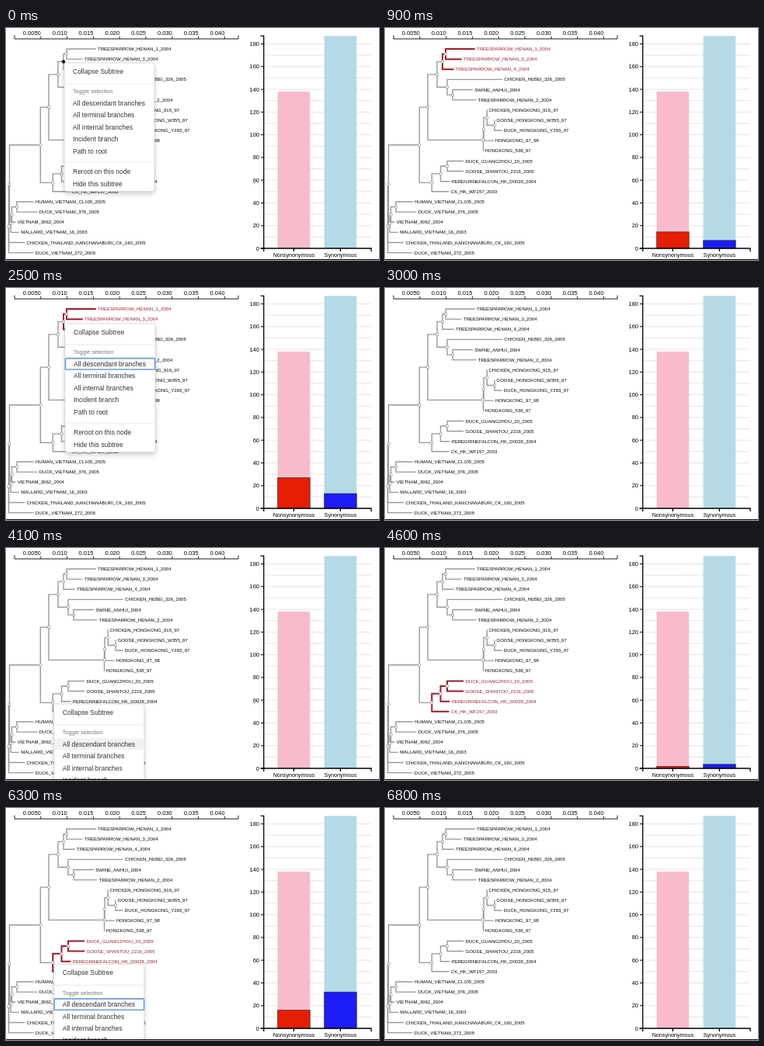
Recreate the animation shown at these times as an HTML page. Size 480x299 px, loop 7000 ms.

```html
<!DOCTYPE html>
<html lang="en">
<head>
<meta charset="utf-8">
<title>Tree selection and substitution counts</title>
<style>
html, body { margin: 0; width: 100%; height: 100%; overflow: hidden; background: #fff; }
svg { display: block; width: 480px; height: 299px; font-family: "Liberation Sans", Arial, sans-serif; }
.branch { fill: none; stroke: #999; stroke-width: 1.4; }
.branch.on { stroke: #9e1a2c; stroke-width: 2; }
.tip { font-size: 6.02px; }
.tip.on { fill: #9e1a2c; }
.node { fill: #fff; stroke: #999; stroke-width: 0.9; }
.node.hot { fill: #000; stroke: #000; }
.axis { fill: none; stroke: #000; }
.num { font-size: 7.5px; text-anchor: end; }
.cat { font-size: 7.2px; text-anchor: middle; }
.item { font-size: 8.5px; fill: #333; }
.head { font-size: 7.2px; fill: #777; }
</style>
</head>
<body>
<svg id="stage" viewBox="0 0 480 299"></svg>
<script>
const LOOP = 7000;
const stage = document.getElementById('stage');

function add(parent, tag, attrs, text) {
  const el = document.createElementNS('http://www.w3.org/2000/svg', tag);
  for (const k in attrs) el.setAttribute(k, attrs[k]);
  if (text !== undefined) el.textContent = text;
  parent.appendChild(el);
  return el;
}
const show = (el, on) => el.setAttribute('visibility', on ? 'visible' : 'hidden');

// ---- tree: leaves are [label, label x], inner nodes are {x, kids}
const clade = (x, ...kids) => ({ x, kids });
const sparrows = clade(74,
  clade(78, ['TREESPARROW_HENAN_1_2004', 118], ['TREESPARROW_HENAN_3_2004', 101]),
  ['TREESPARROW_HENAN_4_2004', 91]);
const ducks = clade(60.3,
  clade(71.5,
    clade(80, ['DUCK_GUANGZHOU_20_2005', 103.5], ['GOOSE_SHANTOU_2216_2005', 103.5]),
    ['PEREGRINEFALCON_HK_D0028_2004', 85.7]),
  ['CK_HK_WF157_2003', 84.8]);
const hongkong = clade(126.5,
  clade(127,
    clade(131.3, ['CHICKEN_HONGKONG_915_97', 133.5],
      clade(141, ['GOOSE_HONGKONG_W355_97', 143.5], ['DUCK_HONGKONG_Y283_97', 152.8])),
    ['HONGKONG_97_98', 142]),
  ['HONGKONG_538_97', 128.5]);
const others = clade(67, sparrows,
  clade(80, ['CHICKEN_HEBEI_326_2005', 153.2],
    clade(87, ['SWINE_ANHUI_2004', 115.3], ['TREESPARROW_HENAN_2_2004', 119.8])));
const vietnam = clade(6.2,
  clade(7.5, clade(14, ['HUMAN_VIETNAM_CL105_2005', 38], ['DUCK_VIETNAM_376_2005', 42.7]),
    ['VIETNAM_3062_2004', 14.7]),
  ['MALLARD_VIETNAM_16_2003', 19.3]);
const root = clade(3.5,
  clade(4.5, clade(44.3, clade(55, others, hongkong), ducks), vietnam),
  ['CHICKEN_THAILAND_KANCHANABURI_CK_160_2005', 26.5],
  ['DUCK_VIETNAM_272_2005', 37.8]);

const branches = add(stage, 'g'), nodes = add(stage, 'g'), tips = add(stage, 'g');
let row = 0;

function place(n) {
  if (Array.isArray(n)) return { x: n[1] - 2.3, y: 27 + 13.13 * row++, label: n, parts: [] };
  n.kids = n.kids.map(place);
  n.y = n.kids.reduce((s, k) => s + k.y, 0) / n.kids.length;
  return n;
}

function drawTree(n) {
  n.parts = [];
  for (const k of n.kids || []) {
    const path = add(branches, 'path', { class: 'branch', d: `M${n.x} ${n.y}V${k.y}H${k.x}` });
    drawTree(k);
    n.parts.push(path, ...k.parts);
  }
  if (n.label) {
    n.parts.push(add(tips, 'text', { class: 'tip', x: n.label[1], y: n.y + 2.1 }, n.label[0]));
  } else {
    n.dot = add(nodes, 'circle', { class: 'node', cx: n.x, cy: n.y, r: 1.8 });
  }
}
place(root);
drawTree(root);

function select(n, on) {
  for (const p of n.parts) p.classList.toggle('on', on);
}

// ---- distance scale
add(stage, 'path', { class: 'axis', 'stroke-width': 0.9, d: 'M11 9.5V14H299V9.5' });
for (let i = 1; i <= 8; i++) {
  const x = 11 + 33.8 * i;
  add(stage, 'path', { class: 'axis', 'stroke-width': 0.8, d: `M${x} 10.5V14` });
  add(stage, 'text', { class: 'num', x, y: 9 }, (i * 0.005).toFixed(i === 1 ? 4 : 3));
}

// ---- bar chart
const BASE = 284, UNIT = 1.464;
const yOf = v => BASE - v * UNIT;
for (let v = 10; v <= 180; v += 10)
  add(stage, 'path', { d: `M332 ${yOf(v)}H470`, stroke: '#ddd', 'stroke-width': 0.8 });

const bar = (x, v, fill) =>
  add(stage, 'rect', { x, y: yOf(v), width: 41.6, height: v * UNIT, fill });
bar(349.6, 138, '#f8bbcb');
bar(409.6, 187, '#b4dae5');
const reds = bar(349.6, 0, '#e61e04'), blues = bar(409.6, 0, '#1c1cf6');
for (const b of [reds, blues]) {
  b.setAttribute('stroke', '#222');
  b.setAttribute('stroke-width', 0.6);
}
function setBar(el, v) {
  el.setAttribute('y', yOf(v));
  el.setAttribute('height', v * UNIT);
  show(el, v > 0.01);
}

add(stage, 'path', { class: 'axis', 'stroke-width': 1.3, d: `M327.5 10.2H331.7V${BASE}H327.5` });
add(stage, 'path', { class: 'axis', 'stroke-width': 1.3, d: `M331.7 288V${BASE}H470V288M370.4 ${BASE}v4M430.4 ${BASE}v4` });
for (let v = 0; v <= 180; v += 20) {
  add(stage, 'path', { class: 'axis', 'stroke-width': 1, d: `M328 ${yOf(v)}H331.7` });
  add(stage, 'text', { class: 'num', x: 326, y: yOf(v) + 2.6 }, v);
}
add(stage, 'text', { class: 'cat', x: 370.4, y: 294.6 }, 'Nonsynonymous');
add(stage, 'text', { class: 'cat', x: 430.4, y: 294.6 }, 'Synonymous');

// ---- context menu
const menu = add(stage, 'g', {});
menu.style.filter = 'drop-shadow(0 3px 3px rgba(0,0,0,.2))';
add(menu, 'rect', { width: 116, height: 165.5, rx: 2.5, fill: '#fff', stroke: '#ccc', 'stroke-width': 0.6 });
const hover = add(menu, 'rect', { x: 0.3, y: 44.3, width: 115.4, height: 14.9, fill: '#f1f1f1' });
const ring = add(menu, 'rect', { x: 0.4, y: 44.6, width: 115.4, height: 14.4, rx: 1, fill: '#fafafa', stroke: '#6c9fe0', 'stroke-width': 1.6 });
for (const y of [27, 128])
  add(menu, 'path', { d: `M0.3 ${y}H115.7`, stroke: '#e5e5e5', 'stroke-width': 0.8 });
add(menu, 'text', { class: 'head', x: 11, y: 39.4 }, 'Toggle selection');
[['Collapse Subtree', 14.2], ['All descendant branches', 55], ['All terminal branches', 70.4],
 ['All internal branches', 85.8], ['Incident branch', 101.2], ['Path to root', 116.6],
 ['Reroot on this node', 143.4], ['Hide this subtree', 158.8]]
  .forEach(([s, y]) => add(menu, 'text', { class: 'item', x: 11, y }, s));

add(stage, 'rect', { y: 298, width: 480, height: 1, fill: '#111' });

// ---- timeline
const visits = [
  { x: 75, y: 45, open: 0, hover: 200, ring: 500, close: 600 },
  { x: 76, y: 46, open: 1600, hover: 2100, ring: 2400, close: 2600 },
  { x: 61.8, y: 201, open: 3700, hover: 4100, ring: 4300, close: 4400 },
  { x: 61.8, y: 201.3, open: 5300, hover: 5700, ring: 6200, close: 6400 }
];
const within = (t, a, b) => t >= a && t < b;

function ease(t, start) {
  const p = Math.min(1, Math.max(0, (t - start) / 500));
  return p < 0.5 ? 4 * p ** 3 : 1 - 4 * (1 - p) ** 3;
}

function draw(t) {
  const first = ease(t, 645) - ease(t, 2500);
  const second = ease(t, 4450) - ease(t, 6300);
  setBar(reds, 27 * first + 16 * second);
  setBar(blues, 13 * first + 32 * second);

  select(sparrows, within(t, 600, 2600));
  select(ducks, within(t, 4400, 6400));
  sparrows.dot.classList.toggle('hot', t < 100 || within(t, 1400, 1800));
  ducks.dot.classList.toggle('hot', within(t, 3300, 3800) || within(t, 5100, 5600));

  const v = visits.find(m => within(t, m.open, m.close));
  menu.setAttribute('display', v ? 'inline' : 'none');
  if (v) {
    menu.setAttribute('transform', `translate(${v.x} ${v.y})`);
    show(hover, within(t, v.hover, v.ring));
    show(ring, t >= v.ring);
  }
}

const begin = performance.now();
function tick() {
  draw((performance.now() - begin) % LOOP);
  requestAnimationFrame(tick);
}
tick();
</script>
</body>
</html>
```
